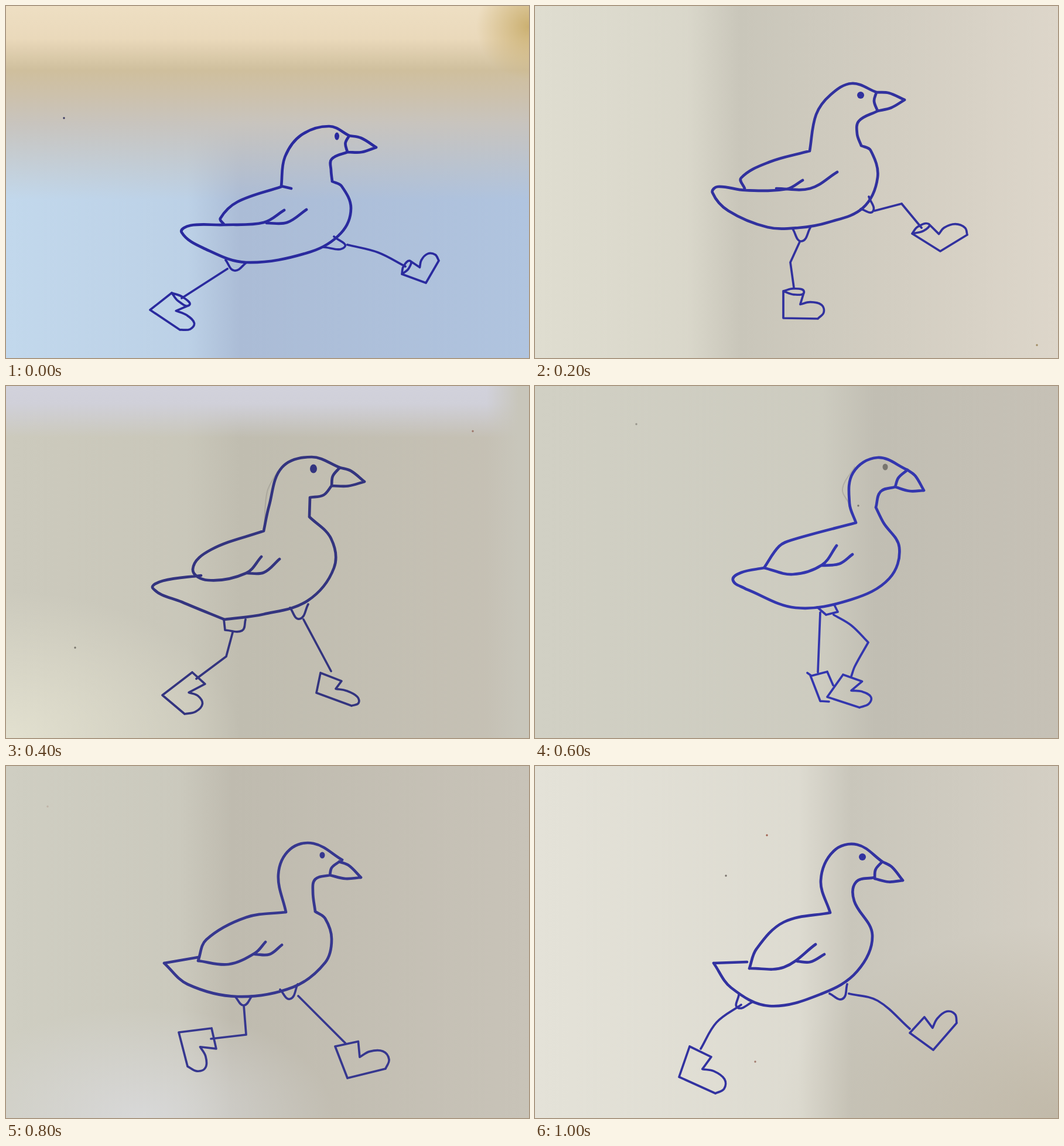
Animation of 893 by 600 pixels, one loop 1200 ms. Source, as an HTML page:

```html
<!DOCTYPE html>
<html lang="en">
<head>
<meta charset="utf-8">
<title>Running duck in boots</title>
<style>
html, body { margin: 0; width: 100%; height: 100%; overflow: hidden; background: #cfcdc2; }
svg { position: absolute; inset: 0; width: 100%; height: 100%; visibility: hidden; }
path { fill: none; stroke: currentColor; stroke-linecap: round; stroke-linejoin: round; }
ellipse { fill: currentColor; }
.body { stroke-width: 4.7; }
.limbs { stroke-width: 3.7; }
.pencil { stroke: #77766f; stroke-width: 2; opacity: .3; }
</style>
</head>
<body>
<script>
// Sheet of paper with a soft shadow along a fold at x.
const fold = (x, left, dark, right) =>
  `linear-gradient(90deg, ${left} 0, color-mix(in srgb, ${left} 75%, ${dark}) ${x - 90}px, ${dark} ${x}px, ${right} 893px)`;
const glow = (w, h, x, color) => `radial-gradient(ellipse ${w}px ${h}px at ${x}px 600px, ${color}, #fff0), `;

// Key points are "x,y"; "|" is a sharp corner, ";" lifts the pen.
// A beak is top, tip, bottom; a boot is top of the heel side, heel, toe.
const poses = [
  {
    ink: '#2a2a9e',
    paper: `radial-gradient(circle at 893px 35px, #cbb071, #cbb07100 90px),
      linear-gradient(#eedfc3, #ead9bb 55px, #cfbf9d 110px, #cdc1ab 150px, #c8c4be 200px, #c5c5c800 330px),
      ${fold(400, '#c2d8ec', '#abbcd6', '#b0c4df')}`,
    neck: '487,311 470,307|476,258 504,220 552,205 586,221',
    beak: '586,221 632,241 583,249',
    trunk: '583,249 556,261 555,280 557,299|573,307 589,345 572,387 520,419 410,437 340,414 300,386 315,374 372,373 440,369 475,348',
    wing: '470,308 395,334 366,362 372,372;445,370 480,369 513,347',
    legs: '375,433 390,451 411,437;541,411 578,411 560,393;378,448 300,498;583,407 635,420 682,444',
    boots: '283,489 246,518 297,552;676,457 717,472 739,434',
    cuffs: true,
    eye: [565, 222, 4, 6.5],
    specks: [[99, 191, '#3a3a60']]
  },
  {
    ink: '#31319e',
    paper: fold(350, '#dfddd0', '#c9c6ba', '#ddd6ca'),
    neck: '469,247 480,185 505,151 541,132 583,147',
    beak: '583,147 631,160 585,179',
    trunk: '585,179 553,196 550,218 557,238|573,246 585,292 560,344 500,369 450,378 397,377 330,349 303,318 312,308 358,314 430,312 457,297',
    wing: '469,247 400,266 352,293 358,311;412,311 470,311 516,283',
    legs: '440,380 455,401 470,378;570,325 577,350 556,346;452,402 436,437|442,480;580,349 626,337|660,378',
    boots: '424,486 424,532 483,533;644,388 692,418 738,390',
    cuffs: true,
    eye: [556, 152, 6, 6],
    specks: [[857, 578, '#a08b62']]
  },
  {
    ink: '#33347f',
    paper: glow(400, 250, 0, '#e2e0cf') +
      `linear-gradient(90deg, #c8c6bb00 820px, #c8c6bb 875px),
      linear-gradient(#d2d2dc, #d0d0d9 30px, #c9c7bb00 88px),
      ${fold(400, '#cccabd', '#c0bdb0', '#c6c1b5')}`,
    neck: '440,247 449,205 471,139 522,121 570,139',
    beak: '570,139 612,163 556,170',
    trunk: '556,170 542,186 519,190|518,223|555,260 560,310 515,366 440,389 373,398|300,368 251,345 268,332 333,323',
    wing: '440,247 350,279 319,312 345,331 410,319 436,291;410,319 440,318 467,295',
    legs: '372,398 374,416|403,417 409,398;485,378 501,397 516,372;387,420 376,461|325,499;508,398 555,486',
    boots: '318,488 267,527 305,559;537,489 530,523 590,545',
    pencil: '441,238 446,180 464,145',
    eye: [525, 141, 6, 7.5],
    specks: [[118, 446, '#77746b'], [797, 77, '#9b7567']]
  },
  {
    ink: '#3336ae',
    paper: fold(580, '#d1d0c4', '#c1beb3', '#c6c1b6'),
    neck: '548,233 537,200 543,148 585,122 636,143',
    beak: '636,143 664,178 615,172',
    trunk: '615,172 590,180 582,207|595,233 622,275 605,328 540,364 445,378 360,346|338,331 352,318 391,310',
    wing: '548,233 440,262 417,273 391,310|440,321 490,305 515,272;490,306 520,303 542,287',
    legs: '482,377 497,390|517,385|511,373;487,386 483,488;510,390 540,408 569,437|546,478 540,495;465,489 472,494|499,487|509,510;470,493 487,537|502,538',
    boots: '526,492 499,530 554,548',
    pencil: '546,138 525,175 536,200',
    eye: [598, 138, 4.5, 5.5, '#77756f'],
    specks: [[552, 204, '#77756f'], [173, 65, '#96948a']]
  },
  {
    ink: '#36378f',
    paper: glow(330, 190, 230, '#d8d8d8') + fold(385, '#cfcec2', '#bfbbaf', '#c8c3b8'),
    neck: '478,249 465,185 485,142 525,132 574,160',
    beak: '569,163 606,190 553,186',
    trunk: '553,186 528,193 524,215 528,248|545,260 556,295 545,335 490,377 395,393 310,372 270,336|328,326',
    wing: '478,249 410,258 342,296 328,332|380,338 425,319 443,300;425,321 450,321 471,305',
    legs: '392,394 406,408 420,392;468,381 485,397 498,372;406,408 410,458|350,465;499,392 580,473',
    boots: '351,447 295,454 310,512;562,478 583,532 648,516',
    eye: [540, 152, 4.5, 5.5],
    specks: [[71, 69, '#bfb3a6']]
  },
  {
    ink: '#3232a0',
    paper: glow(480, 330, 893, '#9d8f7455') + fold(540, '#e4e2d8', '#c9c6bb', '#d4cfc4'),
    neck: '504,250 488,195 510,145 550,134 593,163',
    beak: '593,163 628,195 580,192',
    trunk: '579,190 548,198 545,230 576,288 550,350 490,388 400,409 335,378 305,336|362,334',
    wing: '504,250 425,266 378,312 366,345|425,343 479,304;448,333 470,334 494,321',
    legs: '348,390 346,412 372,402;503,388 525,397 533,372;352,407 310,437 283,482;536,388 585,400 640,448',
    boots: '264,478 246,530 308,558;640,455 680,484 720,438',
    eye: [559, 155, 6, 6],
    specks: [[396, 118, '#a0604f'], [326, 187, '#77706b'], [376, 504, '#a0786b']]
  }
];

const points = text => text.trim().split(/\s+/).map(p => p.split(',').map(Number));
const lines = text => text.split(';');
const mix = (a, b, t, dx, dy) => [a[0] + (b[0] - a[0]) * t + dx, a[1] + (b[1] - a[1]) * t + dy];

// Smooth curve through the points, its handles sized by the distance between neighbours.
function curve(pts) {
  const at = i => pts[Math.max(0, Math.min(pts.length - 1, i))];
  const handle = (i, reach) => {
    const [x0, y0] = at(i - 1), [x1, y1] = at(i + 1), [x, y] = at(i);
    const k = reach / (Math.hypot(x1 - x0, y1 - y0) || 1);
    return [x + k * (x1 - x0), y + k * (y1 - y0)];
  };
  return 'M' + pts[0] + pts.slice(1).map((p, i) => {
    const reach = Math.hypot(p[0] - pts[i][0], p[1] - pts[i][1]) * .35;
    return `C${handle(i, reach)} ${handle(i + 1, -reach)} ${p}`;
  }).join('');
}

function stroke(line) {
  let last = [];
  return line.split('|').map(part => {
    const pts = [...last, ...points(part)];
    last = pts.slice(-1);
    return curve(pts);
  }).join('');
}

function beak(text) {
  const [top, tip, low] = points(text);
  return curve([top, mix(top, tip, .4, 2, -4), tip]) + curve([tip, mix(tip, low, .5, 0, 4), low]) +
    curve([top, mix(top, low, .5, -5, -1), low]);
}

// One boot shape, laid out along its sole (a) and its heel (b).
function boot(text, cuff) {
  const [top, heel, toe] = points(text);
  const put = ([a, b]) => heel.map((h, k) => h + a * (toe[k] - h) + b * (top[k] - h));
  const tip = [[1, 0], [1.17, .24], [1.1, .52], [.78, .61], [.49, .52]].map(put);
  const ring = [[0, 1], [.3, 1.1], [.6, .98], [.3, .88], [0, 1]].map(put);
  return `M${top}L${heel}L${toe}` + curve(tip) + `L${ring[2]}` + (cuff ? curve(ring) : `L${top}`);
}

const dot = ([x, y, rx, ry, color = 'currentColor']) =>
  `<ellipse cx="${x}" cy="${y}" rx="${rx}" ry="${ry}" style="fill:${color}"/>`;

const sheets = poses.map(pose => {
  const layers = {
    pencil: pose.pencil ? stroke(pose.pencil) : '',
    body: [pose.neck, pose.trunk, ...lines(pose.wing)].map(stroke).join('') + beak(pose.beak),
    limbs: lines(pose.legs).map(stroke).join('') + lines(pose.boots).map(b => boot(b, pose.cuffs)).join('')
  };
  const specks = pose.specks.map(([x, y, color]) => dot([x, y, 1.7, 1.7, color]));
  document.body.insertAdjacentHTML('beforeend',
    `<svg viewBox="0 0 893 600" style="color:${pose.ink};background:${pose.paper}">` +
    Object.entries(layers).map(([name, d]) => `<path class="${name}" d="${d}"/>`).join('') +
    dot(pose.eye) + specks.join('') + '</svg>');
  return document.body.lastElementChild;
});

function draw(now) {
  const shown = Math.floor(now / 200) % sheets.length;
  sheets.forEach((sheet, i) => sheet.style.visibility = i === shown ? 'visible' : 'hidden');
  requestAnimationFrame(draw);
}
draw(performance.now());
</script>
</body>
</html>
```
